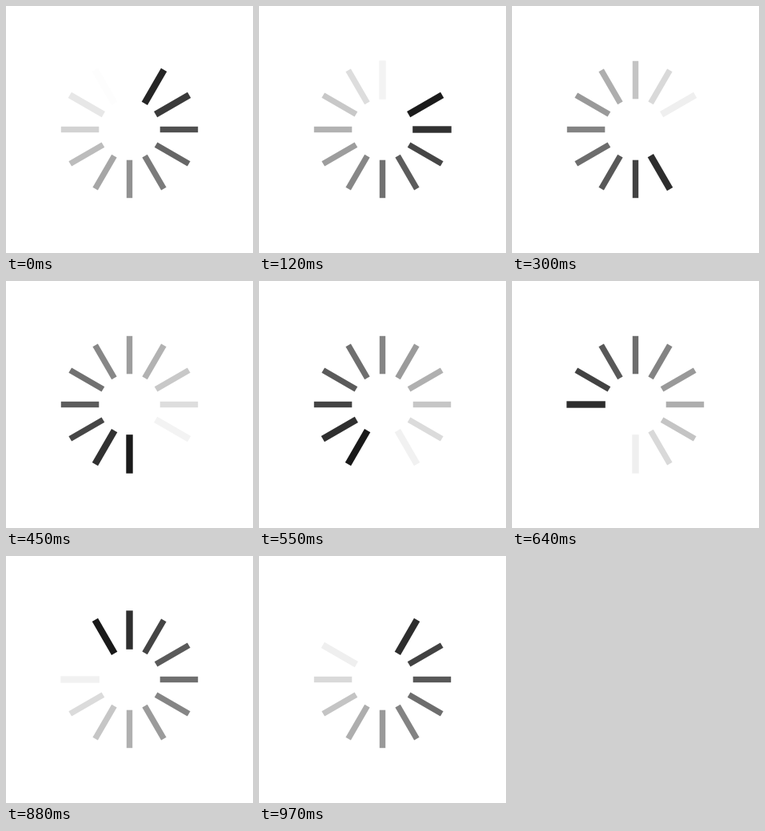
Animation of 309 by 309 pixels, one loop 1000 ms. Source, as an HTML page with a canvas:

```html
<!DOCTYPE html>
<html>
<head>
<meta charset="utf-8">
<style>
html, body { margin: 0; width: 100%; height: 100%; overflow: hidden; background: #fff; }
canvas { display: block; }
</style>
</head>
<body>
<canvas id="stage" width="309" height="309"></canvas>
<script>
const ctx = document.getElementById('stage').getContext('2d');
const BARS = 12, STEPS = 33;

// 33 steps of 30 ms; step 17 lasts 40 ms
function stepAt(ms) {
  return ms < 550 ? Math.min(17, Math.floor(ms / 30)) : Math.floor((ms - 10) / 30);
}

function drawBar(k, head) {
  const ahead = (k - head + BARS) % BARS;
  if (ahead < 0.45 || ahead > 11.1) return;
  const shade = Math.round(255 - 21.6 * (11.1 - ahead));
  const grow = ahead < 2.2 || ahead > 9.9 ? 0.5 : 0;
  const half = 3.7 + grow, inner = 38.2 - grow, outer = 85.7 + grow;
  ctx.save();
  ctx.translate(154.5, 154.5);
  ctx.rotate(k * 2 * Math.PI / BARS);
  ctx.fillStyle = `rgb(${shade},${shade},${shade})`;
  ctx.fillRect(-half, -outer, 2 * half, outer - inner);
  ctx.restore();
}

function draw() {
  const head = stepAt(performance.now() % 1000) / STEPS * BARS;
  ctx.fillStyle = '#fff';
  ctx.fillRect(0, 0, 309, 309);
  for (let k = 0; k < BARS; k++) drawBar(k, head);
  requestAnimationFrame(draw);
}
draw();
</script>
</body>
</html>
```
